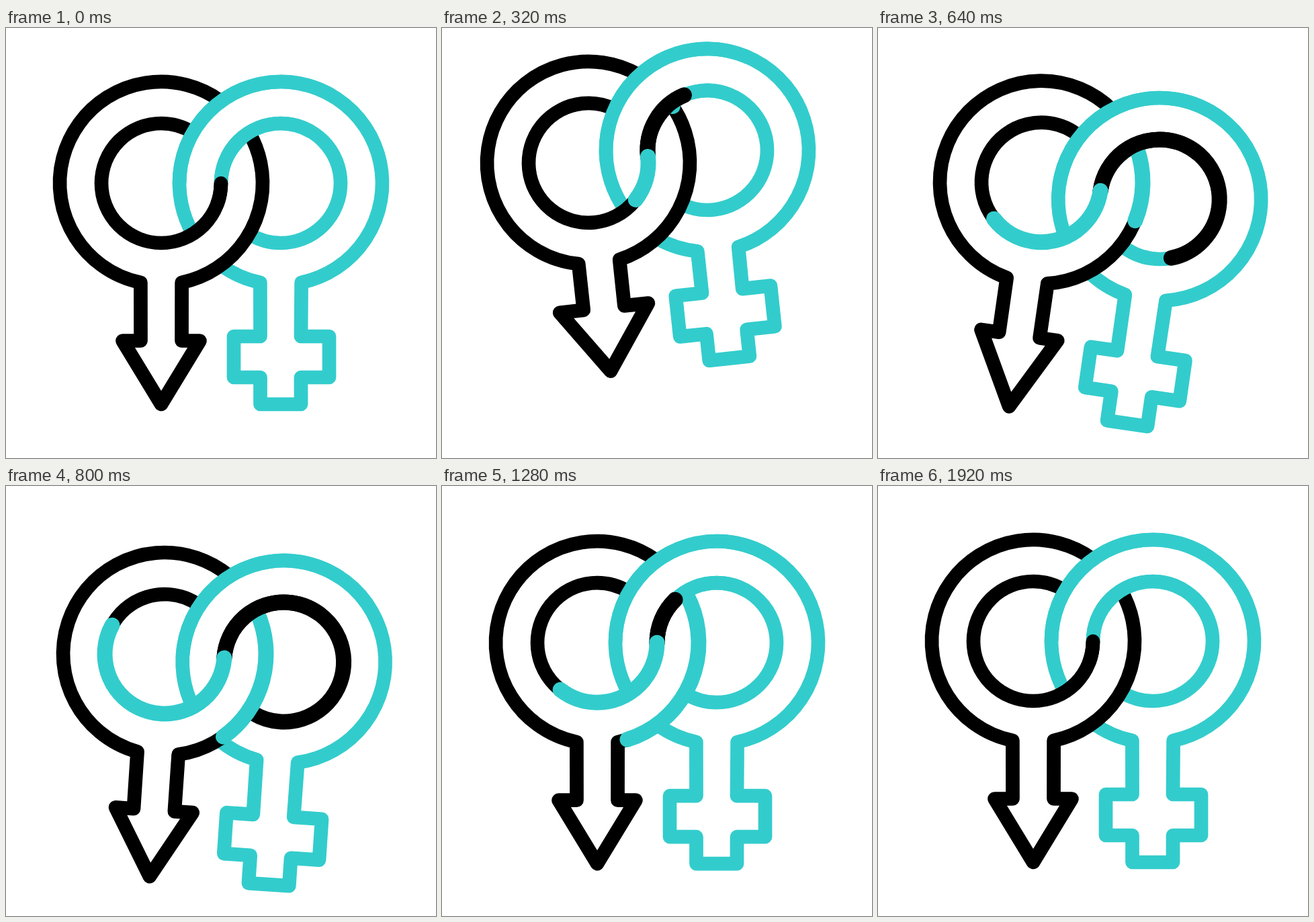
Animation, 640 px wide and 640 px high, one loop 2 s. Source, as an HTML page with a canvas:

```html
<!DOCTYPE html>
<html lang="en">
<head>
<meta charset="utf-8">
<title>Linked symbols</title>
<style>
  html, body { margin: 0; width: 100%; height: 100%; overflow: hidden; background: #fff; }
  canvas { display: block; width: 640px; height: 640px; }
</style>
</head>
<body>
<canvas id="stage" width="640" height="640"></canvas>
<script>
const ctx = document.getElementById('stage').getContext('2d');
const BLACK = '#000', TEAL = '#33cccc';
const LOOP = 2000, STEP = 40;
const OUTER = 151, INNER = 89, LINE = 20.7, TRACE = 23;
const LEFT = -89, RIGHT = 89;
const LEG = 78.3;       // angle where the ring opens into the legs
const CROSS = 53.9;     // outer ring meets outer ring
const NEAR = 30;        // outer ring meets the other inner ring
const FAR = 302;        // inner ring meets the other outer ring

const linear = u => u;
const sine = u => (1 - Math.cos(Math.PI * u)) / 2;
const gather = u => (u + u ** 3) / 2;
const settle = u => 1 - (1 - u) ** 2.1;

// Value that eases from one [time, value, ease] point to the next.
function track(ease, ...points) {
  return t => {
    const i = points.findIndex(p => t < p[0]);
    if (i === 0) return points[0][1];
    if (i < 0) return points[points.length - 1][1];
    const [t0, v0] = points[i - 1], [t1, v1, own = ease] = points[i];
    return v0 + (v1 - v0) * own((t - t0) / (t1 - t0));
  };
}

// Motion of the whole pair
const turn = track(sine, [80, 0], [270, -7.2], [565, 8.8], [1000, 0]);
const shiftX = track(sine, [80, 0], [270, -16.3], [520, 13], [1000, 0]);
const shiftY = track(sine, [80, 0], [295, -40], [790, 25], [900, 25], [1370, 0]);
const stretch = track(sine, [80, 0], [300, -18], [530, 9.5], [960, 0]);

// Degrees covered by each coloured trace
const blackSpan = track(sine, [60, 0], [850, 300], [960, 300], [1390, 0]);
const innerSpan = track(gather, [80, 0], [960, 300], [1920, 0, settle]);
const outerSpan = track(linear, [315, 0], [640, 42.5], [920, 106.8], [1250, 106.8], [1820, 0]);

const rad = deg => deg * Math.PI / 180;

function stroke(color, width, cap) {
  ctx.strokeStyle = color;
  ctx.lineWidth = width;
  ctx.lineCap = cap;
  ctx.lineJoin = 'round';
  ctx.stroke();
}

function arc(x, r, from, to, color, width = LINE, cap = 'butt') {
  ctx.beginPath();
  ctx.arc(x, 0, r, rad(from), rad(to));
  stroke(color, width, cap);
}

function trace(x, r, from, span, color) {
  if (span > 0.5) arc(x, r, from, from + span, color, TRACE, 'round');
}

// Ring opening downwards into legs; points are relative to the ring centre.
function body(x, start, points, end, color) {
  ctx.beginPath();
  ctx.arc(x, 0, OUTER, rad(start), rad(180 - LEG), true);
  for (const [px, py] of points) ctx.lineTo(x + px, py);
  ctx.arc(x, 0, OUTER, rad(LEG), rad(end), true);
  stroke(color, LINE, 'butt');
}

// Squashing shortens the stem; stretching mostly lengthens the far end.
function arrow(s) {
  const y = 234.5 + s - 1.6 * Math.max(s, 0), w = 57.5 + Math.max(-s, 0) / 2;
  return [[-30.5, y], [-w, y], [0, 329 + s], [w, y], [30.5, y]];
}

function cross(s) {
  const top = 228 + s - Math.max(s, 0) / 2, low = top + 61, end = 329 + s;
  return [[-30.5, top], [-70, top], [-70, low], [-30.5, low], [-30.5, end],
    [30, end], [30, low], [72, low], [72, top], [30, top]];
}

function draw(t) {
  const black = blackSpan(t), s = stretch(t);
  ctx.setTransform(1, 0, 0, 1, 0, 0);
  ctx.fillStyle = '#fff';
  ctx.fillRect(0, 0, 640, 640);
  ctx.translate(320 + shiftX(t), 231 + shiftY(t));
  ctx.rotate(rad(turn(t)));

  body(RIGHT, 180 - CROSS, cross(s), 180 - NEAR, TEAL);
  arc(RIGHT, INNER, 180, 180 + FAR, TEAL);
  trace(RIGHT, INNER, 180, black, BLACK);

  body(LEFT, 360 - CROSS, arrow(s), -NEAR, BLACK);
  trace(LEFT, OUTER, 1.5 - NEAR, outerSpan(t), TEAL);

  // The upper part of the right inner ring passes over the left ring.
  arc(RIGHT, INNER, 180, 300, TEAL);
  trace(RIGHT, INNER, 180, Math.min(black, 122), BLACK);

  arc(LEFT, INNER, 0, FAR, BLACK);
  arc(LEFT, INNER, 0, 20, BLACK, LINE, 'round');
  trace(LEFT, INNER, 0, innerSpan(t), TEAL);

  arc(RIGHT, OUTER, 180, 300, TEAL);
}

function tick() {
  const t = performance.now() % LOOP;
  draw(Math.floor(t / STEP) * STEP);
  requestAnimationFrame(tick);
}
tick();
</script>
</body>
</html>
```
